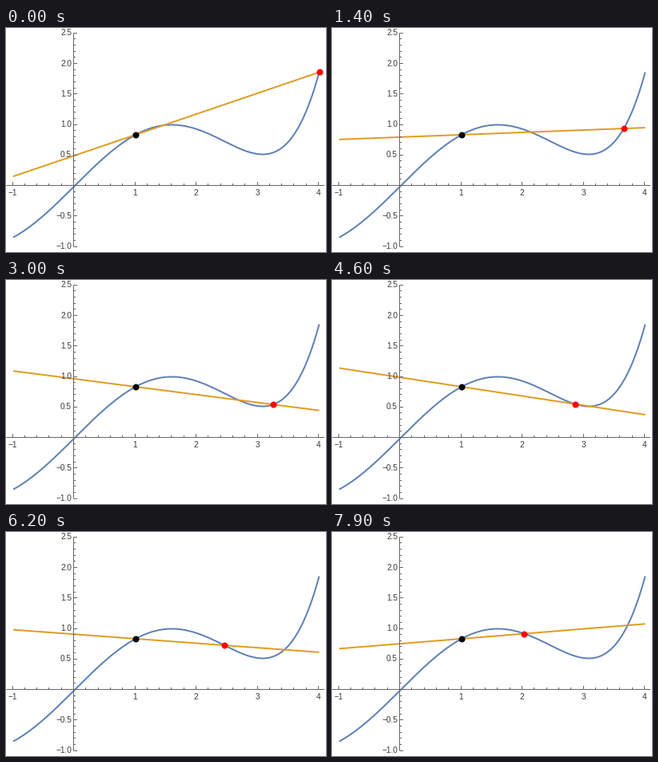
Animation, 400 px wide and 281 px high, one loop 8 s. Source, as a matplotlib script:

```python
import numpy as np
import matplotlib.pyplot as plt
from matplotlib.animation import FuncAnimation

W, H, DPI = 400, 281, 128
PX = 72 / DPI                       # one pixel in points
UNIT = 76.5                         # pixels per unit
AX, AY = 84.5, 197.5                # where the axes cross
X0, Y0 = 85.5, 198.3                # origin of the plotted data
FRAMES, STEP = 80, 0.025
BLUE, ORANGE, GRAY, INK = "#5e81b5", "#e19c24", "#666666", "#3a3a3a"
MAJOR, MINOR = 4.5, 2.5


def f(x):
    return x - x**3 / 6 + x**5 / 120


def sx(x):
    return X0 + UNIT * x


def sy(y):
    return Y0 - UNIT * y


def crisp(v):
    return np.floor(v) + 0.5


def rule(xs, ys):
    ax.plot(xs, ys, color=GRAY, lw=PX, snap=False, zorder=4,
            solid_capstyle="butt")


def label(x, y, text, ha):
    ax.text(x, y, text.replace("-", "\u2212"), ha=ha, va="baseline",
            family="Liberation Sans", size=10 * PX, color=INK, zorder=5)


def curve(xs, ys, color, z):
    return ax.plot(xs, ys, color=color, lw=2 * PX, snap=False, zorder=z,
                   solid_capstyle="butt")[0]


def dot(x, color):
    return ax.plot([sx(x)], [sy(f(x))], "o", ms=8 * PX, mew=0, snap=False,
                   color=color, zorder=6)[0]


fig = plt.figure(figsize=(W / DPI, H / DPI), dpi=DPI, facecolor="white")
ax = fig.add_axes([0, 0, 1, 1])
ax.set(xlim=(0, W), ylim=(H, 0))
ax.axis("off")

# Axes, ticks and labels
rule([AX - 1.1 * UNIT, AX + 4.1 * UNIT], [AY, AY])
rule([AX, AX], [AY - 2.5 * UNIT, AY + UNIT])
for i in range(-5, 21):
    if i == 0:
        continue
    x, major = AX + UNIT * i / 5, i % 5 == 0
    rule([crisp(x)] * 2, [AY, AY - (MAJOR if major else MINOR)])
    if major:
        label(x, 210.5, f"{i // 5}", "center")
for i in range(-10, 26):
    if i == 0:
        continue
    y, major = AY - UNIT * i / 10, i % 5 == 0
    rule([AX, AX + (MAJOR if major else MINOR)], [crisp(y)] * 2)
    if major:
        label(82, y + 3.2, f"{i / 10:.1f}", "right")

# Curve, secant line and the two points
xs = np.linspace(-1, 4, 300)
ends = np.array([-1.0, 4.0])
curve(sx(xs), sy(f(xs)), BLUE, 2)
secant = curve([], [], ORANGE, 3)
dot(1, "black")
mover = dot(4, "red")


def update(i):
    x = 4 - STEP * i
    slope = (f(x) - f(1)) / (x - 1)
    secant.set_data(sx(ends), sy(f(1) + slope * (ends - 1)))
    mover.set_data([sx(x)], [sy(f(x))])
    return secant, mover


anim = FuncAnimation(fig, update, frames=FRAMES, interval=100,
                     repeat=True, repeat_delay=0, blit=False)
plt.show()
```
